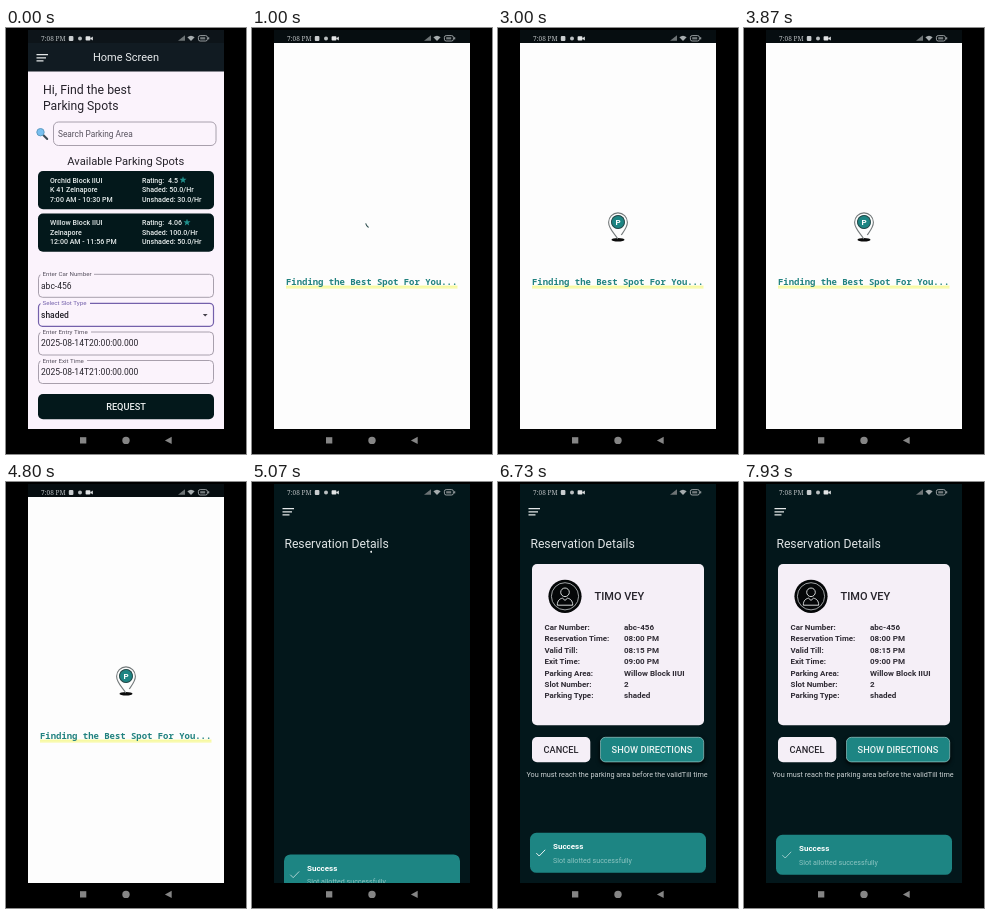
Animation of 240x426 px, one loop 8 s. Source, as an HTML page:

```html
<!DOCTYPE html>
<html lang="en">
<head>
<meta charset="utf-8">
<title>Parking reservation</title>
<style>
  html, body { margin: 0; width: 100%; height: 100%; overflow: hidden; background: #000; }
  svg { display: block; width: 100%; height: 100%; }
  text { font-family: Roboto, sans-serif; white-space: pre; }
  .mono { font-family: "Noto Sans Mono", monospace; }
  .serif { font-family: "Noto Serif", serif; }
  .raised { filter: drop-shadow(0 2px 2px #000); }
</style>
</head>
<body>
<svg id="stage" viewBox="0 0 240 426"></svg>
<script>
const LOOP = 8000;
const TIMES = { search: 930, result: 4930, details: 6070, snackOut: 7650 };
const DARK = '#03181b', PALE = '#fbf3fc', CARD = '#f5eff7', TEAL = '#1d8583', INK = '#26232b';

const text = (x, y, str, size, fill, weight = 400, extra = '') =>
  `<text x="${x}" y="${y}" font-size="${size}" fill="${fill}" font-weight="${weight}" ${extra}>${str}</text>`;
const rect = (x, y, w, h, fill, r = 0, extra = '') =>
  `<rect x="${x}" y="${y}" width="${w}" height="${h}" rx="${r}" fill="${fill}" ${extra}/>`;
const circle = (x, y, r, fill, extra = '') =>
  `<circle cx="${x}" cy="${y}" r="${r}" fill="${fill}" ${extra}/>`;
const path = (d, fill, extra = '') => `<path d="${d}" fill="${fill}" ${extra}/>`;
const line = (d, color, width, extra = '') =>
  path(d, 'none', `stroke="${color}" stroke-width="${width}" ${extra}`);
const group = (id, body) => `<g id="${id}">${body}</g>`;
const centered = 'text-anchor="middle"';

const menuIcon = line('M30.5 26.7h11.5M30.5 29.8h9.5M30.5 32.9h7', '#e4e7e8', 1.3);

function star(x, y, r) {
  const points = Array.from({ length: 10 }, (_, i) => {
    const a = i * Math.PI / 5 - Math.PI / 2, d = i % 2 ? r * 0.42 : r;
    return `${(x + d * Math.cos(a)).toFixed(2)} ${(y + d * Math.sin(a)).toFixed(2)}`;
  });
  return path(`M${points.join('L')}Z`, '#208f8b');
}

function spotCard(top, left, rating, starX, right) {
  const row = (x, str, i) => text(x, top + 11.5 + i * 9.6, str, 7.05, '#e6ecec', 500);
  return rect(32, top, 176, 38.3, DARK, 5) +
    left.map((s, i) => row(44, s, i)).join('') +
    row(136, 'Rating:', 0) + row(162, rating, 0) + star(starX, top + 9, 3.7) +
    right.map((s, i) => row(136, s, i + 1)).join('');
}

function field(top, label, labelWidth, value, focused) {
  const color = focused ? '#7460ab' : '#938b99';
  return rect(32.5, top, 175, 23, 'none', 4, `stroke="${color}" stroke-width="${focused ? 1.2 : 0.8}"`) +
    rect(34.5, top - 2, labelWidth + 3.5, 4, PALE) +
    text(36.6, top + 2, label, 6.2, focused ? color : '#56505e') +
    text(35, top + 14.4, value, 8.5, INK, focused ? 500 : 400);
}

const home = rect(22, 2, 196, 13, '#0d1419') + rect(22, 15, 196, 386, PALE) +
  rect(22, 15, 196, 28.5, '#111b22') + menuIcon +
  text(120, 33.3, 'Home Screen', 11, '#e8ebed', 400, centered) +
  text(37, 65.5, 'Hi, Find the best', 12.3, INK) +
  text(37, 82.3, 'Parking Spots', 12.2, INK) +
  line('M37.2 107l4 4', '#3d4a54', 2, 'stroke-linecap="round"') +
  circle(34.5, 104.2, 3.7, '#79bff0', 'stroke="#5f9cc2" stroke-width="1"') +
  rect(47.5, 94, 162.5, 23.5, 'none', 5, 'stroke="#938b99" stroke-width=".8"') +
  text(52, 108.7, 'Search Parking Area', 8.3, '#57525e') +
  text(119.8, 136.7, 'Available Parking Spots', 11.2, INK, 400, centered) +
  spotCard(143, ['Orchid Block IIUI', 'K 41 Zelnapore', '7:00 AM - 10:30 PM'], '4.5', 177,
    ['Shaded: 50.0/Hr', 'Unshaded: 30.0/Hr']) +
  spotCard(185.5, ['Willow Block IIUI', 'Zelnapore', '12:00 AM - 11:56 PM'], '4.06', 181,
    ['Shaded: 100.0/Hr', 'Unshaded: 50.0/Hr']) +
  field(246.3, 'Enter Car Number', 50, 'abc-456') +
  field(275.3, 'Select Slot Type', 46, 'shaded', true) +
  field(304, 'Enter Entry Time', 47, '2025-08-14T20:00:00.000') +
  field(332.5, 'Enter Exit Time', 43, '2025-08-14T21:00:00.000') +
  path('M196.8 286h4.8l-2.4 2.5z', '#45404b') +
  rect(32, 366, 176, 25.3, DARK, 5) +
  text(120, 381.8, 'REQUEST', 9.2, '#eef1f1', 500, centered);

const searching = rect(22, 15, 196, 386, '#fdfdfd') +
  line('M34 258.2H205.5M34 259.9H205.5', '#f3f65a', 0.8) +
  text(34, 257.4, 'Finding the Best Spot For You...', 8.93, '#21827f', 600, 'class="mono"') +
  '<ellipse id="shadow" cx="120" cy="211.8" rx="6.5" ry="1.8" fill="#0b0b0b"/>' +
  line('M119.8 211C117 206 110.6 201 110.6 194.3A9.4 9.4 0 0 1 129.4 194.3C129.4 199.5 125.6 203.5 123.2 207',
    '#747a7b', 1.1, 'id="outline" pathLength="100"') +
  circle(120, 194, 6.8, TEAL, 'id="disc"') +
  circle(120, 194, 6.5, 'none', 'id="ring" pathLength="100" stroke="#2b4c4c" stroke-width="1" transform="rotate(122 120 194)"') +
  text(120.1, 196.9, 'P', 8, '#fff', 700, `id="letter" ${centered}`);

const rows = [
  ['Car Number:', 'abc-456'], ['Reservation Time:', '08:00 PM'], ['Valid Till:', '08:15 PM'],
  ['Exit Time:', '09:00 PM'], ['Parking Area:', 'Willow Block IIUI'],
  ['Slot Number:', '2'], ['Parking Type:', 'shaded'],
];
const details = rect(34, 82, 172, 161.3, CARD, 5) +
  circle(67, 114.3, 16.6, '#050708') +
  circle(67, 114.3, 13.6, 'none', 'stroke="#dfe3e4" stroke-width=".7"') +
  circle(67, 110.3, 4.3, 'none', 'stroke="#e8ebeb" stroke-width=".9"') +
  line('M59.3 123.2C59.3 118.3 62 116.6 64.5 116.2L67 118.4L69.5 116.2C72 116.6 74.7 118.3 74.7 123.2Z', '#e8ebeb', 0.9) +
  text(96.5, 118.2, 'TIMO VEY', 11, INK, 500) +
  rows.map(([label, value], i) => {
    const y = 148.1 + i * 11.37;
    return text(46.5, y, label, 7.95, '#302c35', 600) + text(126, y, value, 8.05, '#302c35', 600);
  }).join('') +
  rect(34, 255, 58.3, 25.2, CARD, 5) +
  text(63, 270.8, 'CANCEL', 9.2, INK, 500, centered) +
  rect(102.4, 255.3, 103.3, 24.6, TEAL, 5, 'stroke="#9bc9c7" stroke-width=".7" class="raised"') +
  text(154, 270.8, 'SHOW DIRECTIONS', 9.2, '#eaf4f3', 500, centered) +
  text(119, 295.2, 'You must reach the parking area before the validTill time', 7.25, '#cbd2d3', 400, centered);

const snack = rect(32, 350.8, 176, 40, TEAL, 6.5) +
  line('M38.3 371.1l2.9 2.9l6-6.2', '#fff', 1, 'id="check"') +
  text(55, 367, 'Success', 8, '#fff', 700) +
  text(55, 380.5, 'Slot allotted successfully', 7.1, '#8cc4c1');

const result = rect(22, 2, 196, 399, '#03171b') + menuIcon +
  text(32.4, 66.2, 'Reservation Details', 12.2, '#dfe4e5') +
  circle(120, 79, 9.2, 'none', 'id="spinner" pathLength="360" stroke="#f2f4f4" stroke-width="1.9"') +
  group('details', details) + group('snack', snack);

const statusBar = text(35, 12.8, '7:08 PM', 6.5, '#b9bec0', 500, 'class="serif"') +
  rect(62.8, 8, 4.6, 5, '#c9cdcf', 1) + circle(74, 10.4, 2, '#b9bec0') +
  rect(79.6, 8.3, 4.8, 4.3, '#e2e4e5', 0.8) + path('M84 10.4l2.8-1.8v3.8z', '#e2e4e5') +
  path('M172 12.8h7v-5.6z', '#6d7375') +
  path('M181.4 9.3Q185 6.3 188.6 9.3L185 13z', '#a6acae') +
  rect(192.4, 7.6, 9, 5.4, 'none', 1.8, 'stroke="#a6acae" stroke-width=".9"') +
  rect(194.2, 9.2, 5, 2.2, '#747b7d') + rect(202.2, 9.2, 1, 2.2, '#a6acae');

const navBar = rect(0, 401, 240, 25, '#000') + rect(74, 409.2, 6.3, 6.3, '#858585') +
  circle(120, 412.4, 3.7, '#858585') + path('M165.7 408.7v7.4l-6.8-3.7z', '#858585');

document.getElementById('stage').innerHTML = rect(0, 0, 240, 426, '#000') +
  rect(22, 2, 196, 13, '#060d10') +
  group('home', home) + group('searching', searching) + group('result', result) + statusBar + navBar;

const el = id => document.getElementById(id);
const set = (id, name, value) => el(id).setAttribute(name, value);
const show = (id, on) => set(id, 'display', on ? 'inline' : 'none');
const progress = (t, start, length) => Math.min(1, Math.max(0, (t - start) / length));
const smooth = p => p * p * (3 - 2 * p);
const easeOutCirc = p => Math.sqrt(1 - (1 - p) ** 2);

function drawPin(t) {
  const reveal = (id, p) => {
    set(id, 'stroke-dasharray', `${100 * p} 200`);
    show(id, p > 0);
  };
  reveal('ring', progress(t, TIMES.search, 570));
  reveal('outline', smooth(progress(t, 1270, 600)));
  set('disc', 'opacity', progress(t, 1400, 200));
  set('letter', 'opacity', progress(t, 1600, 200));
  set('shadow', 'rx', 6.5 * smooth(progress(t, 1650, 300)));
}

// The arc grows from its head, then shrinks from its tail, while the whole ring turns.
function drawSpinner(t) {
  const turns = (t - 5730) / 1333 + 0.5, cycle = Math.floor(turns), p = turns - cycle;
  const head = smooth(Math.min(1, 2 * p)), tail = smooth(Math.max(0, 2 * p - 1));
  const start = 78 + 300 * (cycle + tail) + 360 * (turns - 0.5);
  set('spinner', 'stroke-dasharray', `${10 + 300 * (head - tail)} 720`);
  set('spinner', 'transform', `rotate(${start} 120 79)`);
}

function drawSnack(t) {
  const shown = t < TIMES.snackOut
    ? progress(t, TIMES.result, 800)
    : 1 - progress(t, TIMES.snackOut, 1000);
  set('snack', 'transform', `translate(0 ${50 * (1 - easeOutCirc(shown))})`);
  set('check', 'opacity', 0.65 - 0.3 * Math.cos(Math.PI * (t - 5550) / 1000));
}

function render(t) {
  show('home', t < TIMES.search);
  show('searching', t >= TIMES.search && t < TIMES.result);
  show('result', t >= TIMES.result);
  show('spinner', t < TIMES.details);
  show('details', t >= TIMES.details);
  drawPin(t);
  drawSpinner(t);
  drawSnack(t);
}

const began = performance.now();
function tick() {
  render((performance.now() - began) % LOOP);
  requestAnimationFrame(tick);
}
tick();
</script>
</body>
</html>
```
